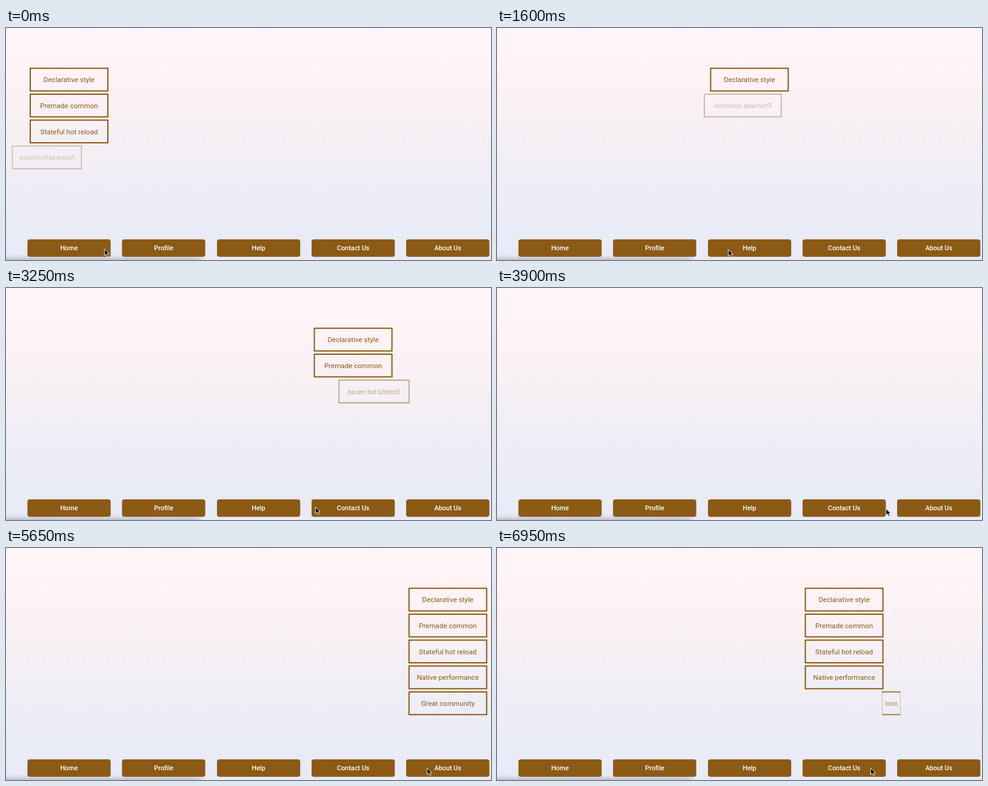
Recreate the animation shown at these times as an HTML page. Size 800 by 382 pixels, loop 7000 ms.

```html
<!DOCTYPE html>
<html lang="en">
<head>
<meta charset="utf-8">
<title>Menu bar</title>
<style>
  html, body { margin: 0; width: 100%; height: 100%; overflow: hidden; }
  body {
    position: relative;
    font-family: Roboto, sans-serif;
    background: linear-gradient(#fff5f7, #fff3f6 20%, #f3eff4 52%, #ebecf8 82%, #e7eaf8);
  }
  /* The page is laid out at 1200 x 573 and shown at two thirds */
  #page {
    position: absolute; left: 0; top: 0;
    width: 1200px; height: 573px;
    transform: scale(.666667); transform-origin: 0 0;
  }
  .tab, .item, .edge { position: absolute; box-sizing: border-box; }
  .tab, .item { text-align: center; white-space: nowrap; }
  .tab {
    top: 522px; width: 206px; height: 43px;
    border-radius: 6px;
    background: #8b5a14;
    color: #fff;
    font-size: 16.3px; font-weight: 500; line-height: 43px;
  }
  .item {
    width: 195px; height: 59px;
    border: 3px solid #8b5a14;
    color: #8b5a14;
    font-size: 17.4px; line-height: 54px;
  }
  .edge {
    left: -30px; top: 575px; width: 510px; height: 30px;
    box-shadow: 0 0 18px rgba(0, 0, 0, .45);
  }
  #cursor { position: absolute; left: 0; top: 0; width: 12px; height: 16px; overflow: visible; }
</style>
</head>
<body>
<div id="page"><div class="edge"></div></div>
<svg id="cursor" viewBox="0 0 12 16">
  <path d="M.5 .5V11.2L3 8.9L4.8 13L6.8 12.1L5 8.2H8.4Z" fill="#000" stroke="#fff" stroke-width=".9"/>
</svg>
<script>
const LOOP = 7000, STEP = 50, SPIN = 200, TURN = 300, RADIUS = 120;
const SCALE = 2 / 3, PITCH = 234.3, TAB_LEFT = 53, TAB_WIDTH = 206, ITEM_WIDTH = 195;
const ENTER = 450, LEAVE = 250, EDGE_Y = 363;

const tabs = ['Home', 'Profile', 'Help', 'Contact Us', 'About Us'];
const labels = ['Declarative style', 'Premade common', 'Stateful hot reload',
  'Native performance', 'Great community'];

// Each hover: which tab, when it opens and closes, where the pointer rests
const visits = [
  { tab: 0, open: -674, close: 100, rest: [142, 364] },
  { tab: 1, open: 162, close: 1250, rest: [298, 364] },
  { tab: 2, open: 1317, close: 2690, rest: [396, 365] },
  { tab: 3, open: 2752, close: 3900, rest: [510, 360] },
  { tab: 4, open: 4094, close: 5900, rest: [694, 362] },
  { tab: 3, open: 6016, close: LOOP, rest: [616, 362] }
];

const page = document.getElementById('page');
const cursor = document.getElementById('cursor');

const clamp = v => Math.min(1, Math.max(0, v));
const ease = v => v * v * (3 - 2 * v);
const mix = (a, b, k) => a.map((v, i) => v + (b[i] - v) * k);
const tabLeft = i => TAB_LEFT + i * PITCH;

function addBox(cls, text, left, top) {
  const el = document.createElement('div');
  el.className = cls;
  el.textContent = text;
  el.style.left = left + 'px';
  el.style.top = top;
  return page.appendChild(el);
}

tabs.forEach((name, i) => addBox('tab', name, tabLeft(i), ''));
const items = labels.map((text, i) => addBox('item', text, 0, 98 + i * 64 + 'px'));

function drawMenu(t) {
  const visit = visits.find(v => t >= v.open && t < v.close);
  items.forEach((el, i) => {
    const p = visit ? ease(clamp((t - visit.open) / SPIN - i)) : 0;
    el.style.opacity = p;
    if (!p) return;
    // Each item swings round a vertical axis set behind it
    const angle = (1 - p) * TURN * Math.PI / 180;
    const x = tabLeft(visit.tab) + (TAB_WIDTH - ITEM_WIDTH) / 2 + RADIUS * Math.sin(angle);
    el.style.transform = `translateX(${x}px) scaleX(${Math.cos(angle)})`;
  });
}

// Point where the pointer crosses the side of a tab that faces another one
function crossing(visit, other) {
  if (!other) return visit.rest;
  const side = other.tab > visit.tab ? TAB_WIDTH : 0;
  return [(tabLeft(visit.tab) + side) * SCALE, EDGE_Y];
}

function pointerAt(t) {
  const i = visits.findLastIndex(v => t >= v.open);
  const visit = visits[i], next = visits[i + 1];
  const out = crossing(visit, next);
  if (t > visit.close) {
    const k = (t - visit.close) / (next.open - visit.close);
    return mix(out, crossing(next, visit), k);
  }
  const entered = mix(crossing(visit, visits[i - 1]), visit.rest,
    ease(clamp((t - visit.open) / ENTER)));
  return mix(entered, out, ease(clamp(1 - (visit.close - t) / LEAVE)));
}

const start = performance.now();
function draw() {
  const t = Math.floor((performance.now() - start) % LOOP / STEP) * STEP;
  const [x, y] = pointerAt(t);
  drawMenu(t);
  cursor.style.transform = `translate(${x}px, ${y}px)`;
  requestAnimationFrame(draw);
}
draw();
</script>
</body>
</html>
```
